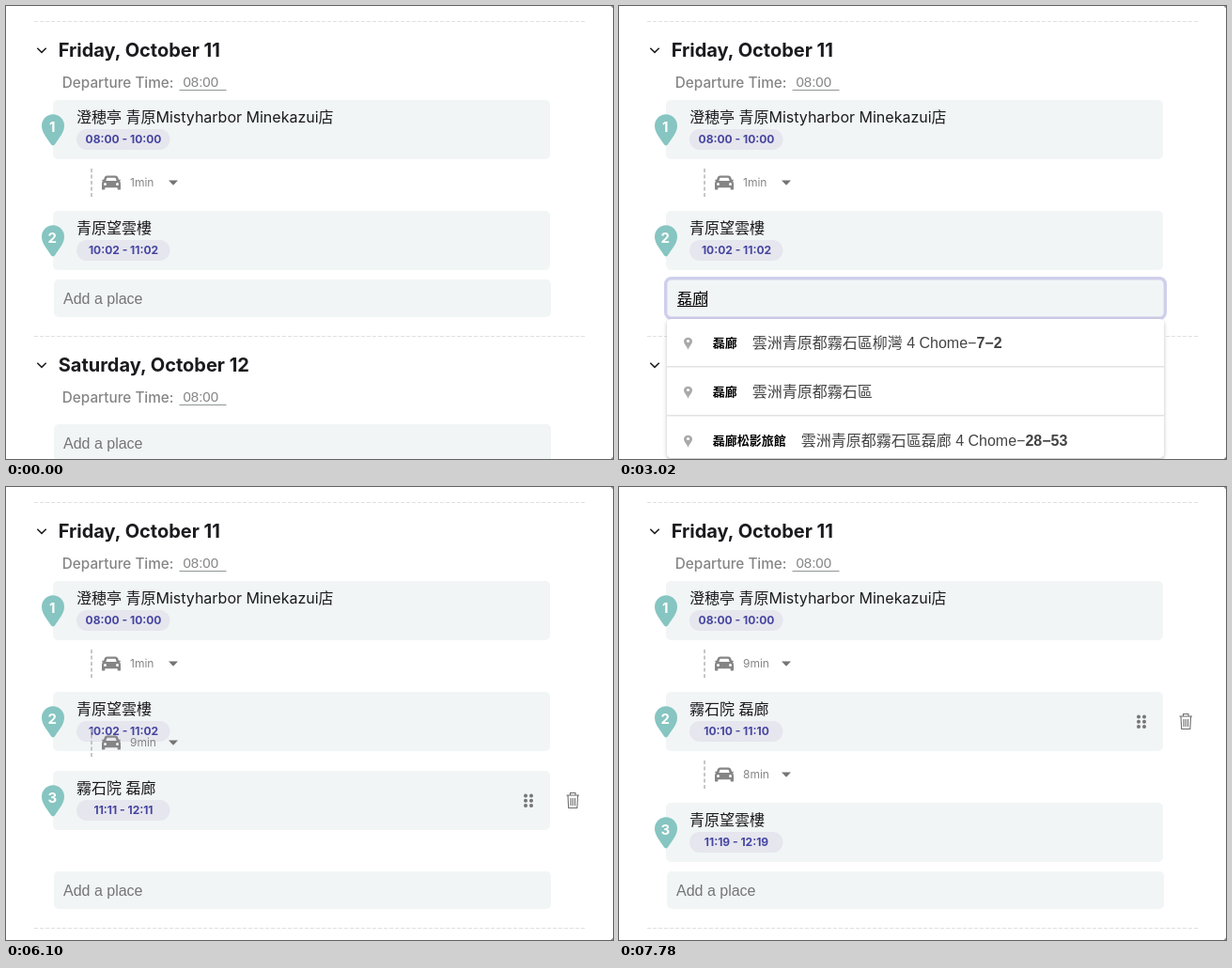
These frames come from a looping animation (646x482 px, 8000 ms). An HTML page:

```html
<!DOCTYPE html>
<html lang="zh-Hant">
<head>
<meta charset="utf-8">
<title>Trip planner</title>
<style>
  html, body { margin: 0; width: 100%; height: 100%; overflow: hidden; background: #fff; }
  svg { display: block; width: 100vw; height: 100vh; }
  text { font: 16px Inter, 'Noto Sans CJK TC', 'Noto Sans CJK JP', 'Noto Sans CJK', sans-serif; fill: #1b1b1f; }
  .day { font-size: 20px; font-weight: 700; }
  .label { font-size: 15.3px; font-weight: 500; fill: #858585; }
  .field { font-family: 'Liberation Sans', 'Noto Sans CJK TC', 'Noto Sans CJK JP', 'Noto Sans CJK', sans-serif; fill: #000; }
  .clock { font-size: 15px; fill: #858585; }
  .hint { fill: #757575; }
  .pill { font-size: 12px; font-weight: 700; fill: #4645a0; text-anchor: middle; }
  .num { font-size: 15px; font-weight: 700; fill: #fff; text-anchor: middle; }
  .mins { font-size: 12px; fill: #858585; }
  .addr { fill: #444; }
  .name { font-size: 13px; font-weight: 700; fill: #000; }
  .bold { font-weight: 700; }
  .small { font-size: 13.3px; fill: #666; }
</style>
</head>
<body>
<svg id="stage" viewBox="0 0 646 482" preserveAspectRatio="none"></svg>
<script>
const stage = document.getElementById('stage');
const LOOP = 8000, STEP = 70, PHASE = 10;
const REGION = '雲洲青原都霧石區';
const ADDRESS = REGION + '柳灣 4 Chome−';

// Suggestion lists: [name, address, bold tail]
const LISTS = {
  first: [
    ['漣汀小館', '雲洲柳川市石嶺區晨露路'],
    ['蘿嵐茶坊', '雲洲柳川市松影區'],
    ['綠汀織品行', '雲洲青原都霧石區']
  ],
  single: [['沐綾織品專賣店 絮語棉蘿綺絲 石嶺店', '雲洲柳川市石嶺區晨露路']],
  second: [
    ['磊汀', '雲洲柳川市石嶺區'],
    ['磊嵐茶坊', '雲洲柳川市松影區晨露路'],
    ['磊影書屋', REGION]
  ],
  third: [
    ['磊汀', REGION],
    ['磊廊', REGION],
    ['磊石小館', '雲洲柳川市松影區']
  ],
  final: [
    ['磊廊', ADDRESS, '7−2'],
    ['磊廊', REGION],
    ['磊廊松影旅館', REGION + '磊廊 4 Chome−', '28−53']
  ]
};

// Each entry holds from its time on
const TYPED = [[0, ''], [990, 'ㄌ'], [1830, 'ㄌㄟ'], [2040, '磊'], [2390, '磊ㄌ'],
  [2460, '磊ㄌㄤ'], [2810, '磊廊'], [4350, ADDRESS + '7−2 磊廊'], [4490, '']];
const SHOWN = [[0, ''], [1270, 'first'], [1970, 'single'], [2040, 'second'],
  [2180, 'third'], [2530, ''], [3020, 'final'], [4350, '']];
const CARET = [[0, false], [500, true], [990, false], [1060, true], [1620, false],
  [1830, true], [3370, false], [3930, true], [4350, false]];
const DRAG_X = [[6100, 0], [6240, 11], [6380, 15]];
const DRAG_Y = [[6030, 0], [6100, -34], [6380, -123], [6450, -130]];

const held = (track, t) => track.reduce((v, k) => t >= k[0] ? k[1] : v, track[0][1]);
const clamp = x => Math.max(0, Math.min(1, x));
const ease = x => 1 - (1 - clamp(x)) ** 3;
const mix = (a, b, p) => a + (b - a) * p;

function along(track, t) {
  let v = track[0][1];
  for (let i = 1; i < track.length; i++) {
    const [t0, a] = track[i - 1], [t1, b] = track[i];
    if (t >= t0) v = mix(a, b, clamp((t - t0) / (t1 - t0)));
  }
  return v;
}

const text = (x, y, cls, s) => `<text x="${x}" y="${y}" class="${cls}">${s}</text>`;
const rect = (x, y, w, h, r, fill, more = '') =>
  `<rect x="${x}" y="${y}" width="${w}" height="${h}" rx="${r}" fill="${fill}" ${more}/>`;
const path = (d, fill, more = '') => `<path d="${d}" fill="${fill}" ${more}/>`;
const move = (x, y, body, more = '') => `<g transform="translate(${x} ${y})" ${more}>${body}</g>`;
const line = (d, color, width, more = '') => path(d, 'none', `stroke="${color}" stroke-width="${width}" ${more}`);

const divider = line('M30 16.5H618', '#e0e0e0', 1, 'stroke-dasharray="4 2"');

const dayHead = title => divider +
  line('M33.3 44.7L38 49.4L42.7 44.7', '#222', 1.6) +
  text(55.7, 54, 'day', title) +
  text(59.8, 86.8, 'label', 'Departure Time:') +
  text(188.5, 86, 'field clock', '08:00') +
  line('M184.5 89.5H234.5', '#8f9794', 1);

const car = move(112, 188,
  path('M-4.6-7.6H4.6Q6.3-7.6 7-6L8-3.2H9.6Q10.6-2.4 9-1.4Q10-.5 10 1V6.4Q10 7.6 8.8 7.6H7.6Q6.6 7.6 6.6 6.6V5.2H-6.6V6.6Q-6.6 7.6-7.6 7.6H-8.8Q-10 7.6-10 6.4V1Q-10-.5-9-1.4Q-10.6-2.4-9.6-3.2H-8L-7-6Q-6.3-7.6-4.6-7.6Z' +
    'M-4.5-5.2L-5.7-2H5.7L4.5-5.2ZM-8 1.5a1.5 1.5 0 1 0 3 0a1.5 1.5 0 1 0-3 0ZM5 1.5a1.5 1.5 0 1 0 3 0a1.5 1.5 0 1 0-3 0Z',
    '#858585', 'fill-rule="evenodd"'));

const ride = mins => line('M91 173V203', '#b5b5b5', 1.5, 'stroke-dasharray="4 2.5"') + car +
  text(132, 192, 'mins', mins + 'min') +
  path('M173 185.5h10l-5 5.2z', '#757575');

const dots = [0, 1, 2, 3, 4, 5].map(i =>
  `<circle cx="${553 + i % 2 * 6}" cy="${126.5 + (i >> 1) * 5.2}" r="2" fill="#757575"/>`).join('');
const trash = line('M596.5 126H610M600.5 126V123.5H606V126M598 126.5L598.7 139.5H607.8L608.5 126.5M601 129V137M603.2 129V137M605.5 129V137', '#6d6d6d', 1.1);

const card = (num, title, hours, tools) =>
  rect(50, 100, 529, 63, 5, '#f1f5f6') +
  path('M50 148.4Q48.6 148.4 47.8 147C44 141 38 134.8 38 127.5A12 12.3 0 1 1 62 127.5C62 134.8 56 141 52.2 147Q51.4 148.4 50 148.4Z', '#86c5c1') +
  text(49.3, 133.5, 'num', num) +
  text(75, 123.8, '', title) +
  rect(75, 131, 99.5, 22, 11, '#e6e6ee') +
  text(125, 146.2, 'pill', hours) +
  (tools ? dots + trash : '');

// A stop is its card with the ride leading to it above
const stop = (mins, ...rest) => ride(mins) + move(0, 118, card(...rest));

const box = (hint = 'Add a place') => rect(51, 291, 529, 40, 5, '#f1f5f6') +
  (hint ? text(61, 316.5, 'field hint', hint) : '');

function suggestions(key, hover) {
  if (!key) return '';
  const rows = LISTS[key], short = rows.length === 1;
  const bottom = short ? 402 : 481;
  let out = rect(51, 333, 529, bottom - 333, 5, '#fff', 'filter="url(#shade)"');
  if (hover) out += rect(51, 333, 529, 50, 0, '#fafafa');
  rows.forEach(([name, addr, tail = ''], i) => {
    const row = path('M73.5 366C72.5 362 69 360 69 356.5A4.6 4.6 0 0 1 78 356.5C78 360 74.5 362 73.5 366Z', '#a9a9a9') +
      '<circle cx="73.5" cy="356.5" r="1.6" fill="#fff"/>' +
      `<text x="99.7" y="363.5" class="field addr"><tspan class="name" dy="-1">${name}</tspan>` +
      `<tspan dx="16" dy="1">${addr}</tspan><tspan class="bold">${tail}</tspan></text>` +
      (i < 2 ? line('M51 383.8H580', '#e2e2e2', short ? 1 : 1.5) : '');
    out += move(0, i * 52, row);
  });
  if (short) out += text(459, 396.7, 'field small', 'powered by') + '<circle cx="556" cy="392" r="6" fill="#4285f4"/>';
  return out;
}

function entry(t) {
  const typed = held(TYPED, t), focus = t >= 500 && t < 4350;
  const end = 62 + 16 * typed.length;
  let out = box(typed ? '' : undefined);
  if (focus) out += rect(49.7, 289.7, 531.6, 42.6, 6, 'none', 'stroke="#cfcfec" stroke-width="3.4"');
  if (typed) out += text(62, 317, 'field', typed);
  if (typed && focus) out += line(`M62 319.5H${end}`, '#000', 1);
  if (held(CARET, t)) out += line(`M${end - .5} 303V320`, '#000', 1);
  return out + suggestions(held(SHOWN, t), t >= 3510);
}

const defs = '<defs><filter id="shade" x="-5%" y="-10%" width="110%" height="125%">' +
  '<feDropShadow dx="0" dy="1.5" stdDeviation="2" flood-color="#000" flood-opacity=".24"/></filter></defs>';
const corners = path('M646 0v2.5L643.5 0zM646 482v-2.5L643.5 482z', '#999');

function draw(t) {
  const added = t >= 4840 ? ease((t - 4770) / 350) : 0;
  const grow = 118 * added;
  const settle = ease((t - 6590) / 630);
  const dx = mix(along(DRAG_X, t), 0, settle);
  const dy = mix(along(DRAG_Y, t), -118, settle);
  const swap = 118 * ease((t - 6170) / 210);
  const renumbered = t >= 7290, timed = t >= 7780;
  const tools = t >= 6100 && t < 6310 || t >= 7360;

  stage.innerHTML = defs + rect(0, 0, 646, 482, 0, '#fff') +
    dayHead('Friday, October 11') +
    card(1, '澄穂亭 青原Mistyharbor Minekazui店', '08:00 - 10:00') +
    move(0, swap, stop(timed ? 8 : 1, renumbered ? 3 : 2, '青原望雲樓', timed ? '11:19 - 12:19' : '10:02 - 11:02')) +
    (added ? move(dx, 118 + dy, stop(9, renumbered ? 2 : 3, '霧石院 磊廊', timed ? '10:10 - 11:10' : '11:11 - 12:11', tools), `opacity="${added}"`) : '') +
    move(0, grow, move(0, 335, dayHead('Saturday, October 12')) + move(0, 154, box()) + entry(t)) +
    corners;
}

let last = -1;
function tick(now) {
  const t = now % LOOP;
  const step = Math.max(0, Math.floor((t - PHASE) / STEP) * STEP + PHASE);
  if (step !== last) draw(last = step);
  requestAnimationFrame(tick);
}
draw(0);
requestAnimationFrame(tick);
</script>
</body>
</html>
```
